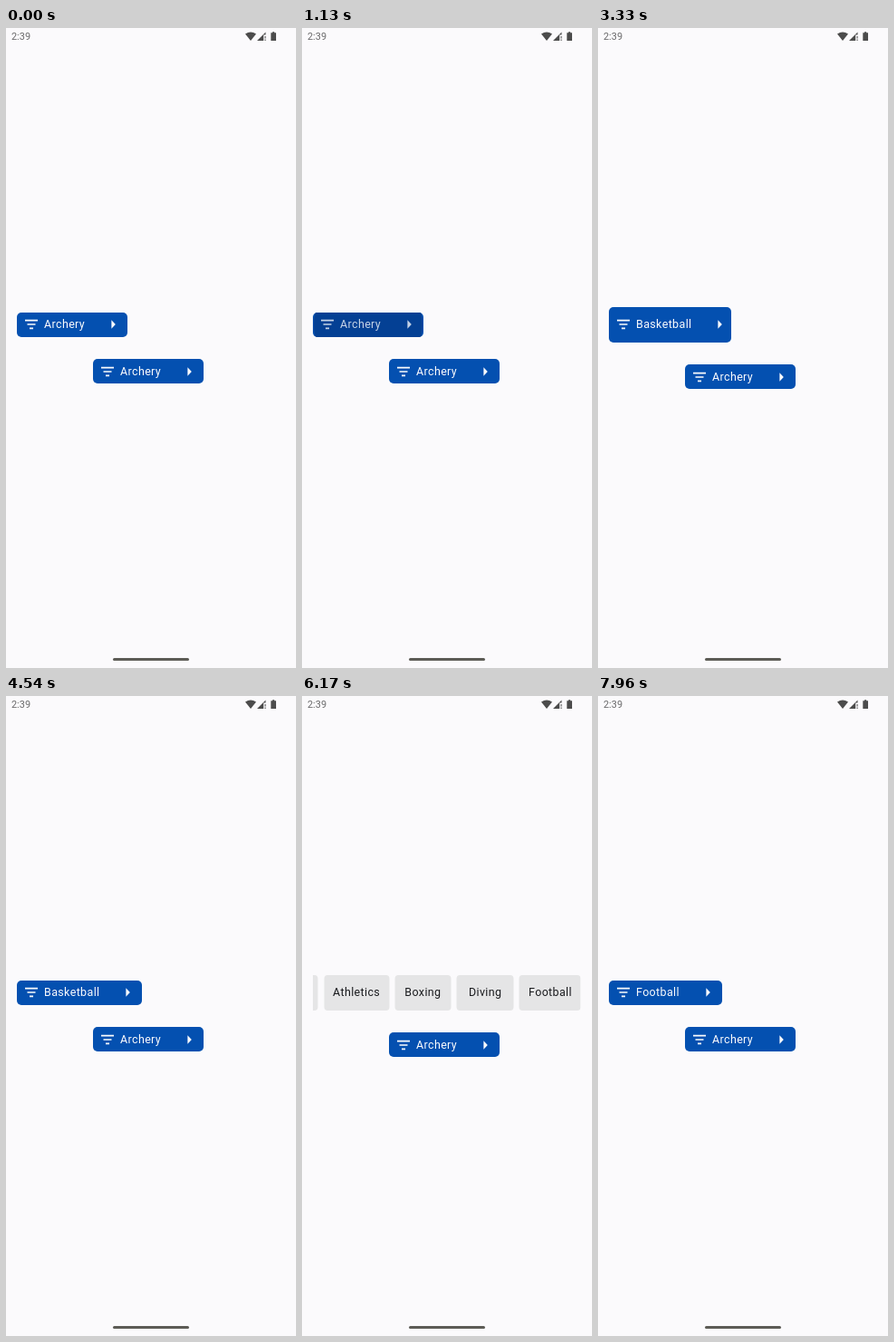
Write an HTML page that moves like this. It is 320x704 px and loops after 8 s.

```html
<!DOCTYPE html>
<html lang="en">
<head>
<meta charset="utf-8">
<title>Sport filter chips</title>
<style>
  html, body { margin: 0; width: 100%; height: 100%; overflow: hidden; background: #fbfafc; }
  body { position: relative; font: 400 12.44px/16px Roboto, "Noto Sans", sans-serif; letter-spacing: .39px; }
  div, svg, span { position: absolute; }
  .clock { left: 6px; top: 2px; font-size: 10.9px; letter-spacing: 0; color: #69696a; }
  .status { left: 262px; top: 2px; }
  .nav { left: 118px; top: 692.5px; width: 84px; height: 3.4px; border-radius: 2px; background: #5d5c56; }
  .view { left: 12px; top: 300px; width: 296px; height: 54px; overflow: hidden; }
  .row { left: 0; top: 0; height: 54px; }
  .list { top: 0; height: 54px; overflow: hidden; }
  .track { top: 0; height: 54px; }
  .chip { top: 6.7px; height: 39.3px; border-radius: 4px; background: #e5e5e6; color: #1a1b1e; overflow: hidden; }
  .chip span { left: 0; width: 100%; top: 11.7px; text-align: center; white-space: nowrap; }
  .head { border-radius: 5px; background: #0450b0; overflow: hidden; color: #fafbfd; }
  .head .label { left: 30px; top: 50%; margin-top: -8px; white-space: nowrap; }
  .head svg { left: 0; top: 50%; margin-top: -14px; }
  .ripple { border-radius: 50%; background: #044094; }
  .chip .ripple { background: rgba(30, 30, 40, .12); }
</style>
</head>
<body>
<div class="clock">2:39</div>
<svg class="status" width="40" height="16" fill="#4c4c4c">
  <path d="M2 4.6Q8 .6 14 4.6L8 12Z"/>
  <path d="M15 12L24.5 2.5V5.4H22.2V12Z"/>
  <path d="M23.4 7h1.4v2.5h-1.4zM23.4 10.6h1.4V12h-1.4z" fill="#7c7c7c"/>
  <path d="M30.3 3.3H32V2.2H34.2V3.3H36V12H30.3Z"/>
</svg>
<div class="view"><div class="row"></div></div>
<div class="nav"></div>
<script>
const LOOP = 8000, VIEW = 296, GAP = 6.3, ARROW = 24;
const WIDTHS = { Archery: 65, Athletics: 72, Basketball: 81, Boxing: 62, Diving: 63, Football: 68 };
const NAMES = Object.keys(WIDTHS);

// Each selection: when it takes effect, when its list opens and closes.
const PHASES = [
  { name: "Archery", from: 0, open: 1150, press: 1000 },
  { name: "Basketball", from: 2880, arrow: 3160, snap: 3420, open: 4895, press: 4720 },
  { name: "Football", from: 6800, arrow: 7060, snap: 7360, open: Infinity, press: Infinity }
];
const TAPS = [["Basketball", 2660, 2880], ["Football", 6590, 6800]];

const row = document.querySelector(".row");
const clamp = (v, a = 0, b = 1) => Math.min(b, Math.max(a, v));
const ease = x => { x = clamp(x); return x * x * (3 - 2 * x); };

// Critically damped spring from 0 to 1
const spring = ms => {
  const x = Math.max(0, ms) / 50;
  return 1 - (1 + x) * Math.exp(-x);
};

function add(parent, cls, tag = "div") {
  const el = document.createElement(tag);
  el.className = cls;
  parent.append(el);
  return el;
}

function place(el, x, w) {
  el.style.left = x + "px";
  el.style.width = w + "px";
}

function makeHead(parent) {
  const el = add(parent, "head");
  const ripple = add(el, "ripple");
  el.insertAdjacentHTML("beforeend",
    `<svg width="160" height="28"><path d="M9 9.6H23M11.5 14H20.5M14 18.4H18" stroke="#fafbfd" stroke-width="1.7"/>
     <path class="arrow" d="M0 9.3L4.4 14L0 18.7Z" fill="#fafbfd"/></svg>`);
  const label = add(el, "label", "span");
  return { el, ripple, label, icon: el.querySelector("svg"), arrow: el.querySelector(".arrow") };
}

function setHead(h, name, extra) {
  const full = WIDTHS[name] + 33;
  h.label.textContent = name;
  h.el.style.width = full + extra + "px";
  h.arrow.setAttribute("transform", `translate(${full + ARROW - 17.6} 0)`);
}

function setRipple(el, x, y, r, alpha) {
  Object.assign(el.style, {
    left: x - r + "px", top: y - r + "px",
    width: 2 * r + "px", height: 2 * r + "px", opacity: alpha
  });
}

const head = makeHead(row);
const list = add(row, "list");
const track = add(list, "track");
const chips = NAMES.map(name => {
  const el = add(track, "chip");
  const ripple = add(el, "ripple");
  add(el, "", "span").textContent = name;
  el.style.width = WIDTHS[name] + "px";
  return { name, el, ripple };
});

const second = makeHead(document.body);
second.el.style.left = "96px";
second.el.style.height = "27.4px";
second.ripple.style.display = "none";
setHead(second, "Archery", ARROW);

function draw(t) {
  const ph = PHASES.filter(p => t >= p.from).pop();
  const opening = t >= ph.open;
  const initial = ph.from === 0;
  let p = opening ? spring(t - ph.open) : initial ? 0 : 1 - spring(t - ph.from);
  if (p < .004) p = 0;
  const tall = opening || (!initial && t < ph.snap);
  const extra = ARROW * (opening ? 1 - p : initial ? 1 : spring(t - ph.arrow));

  // Header
  setHead(head, ph.name, extra);
  const headW = WIDTHS[ph.name] + 33 + extra;
  const h = tall ? 39.3 : 27.4;
  head.el.style.top = (tall ? 6.7 : 12.7) + "px";
  head.el.style.height = h + "px";
  second.el.style.top = (tall ? 370 : 364) + "px";

  const age = t - ph.press;
  const shade = age < 0 ? 0 : clamp(age / 75) * (1 - clamp((age - 430) / 150));
  setRipple(head.ripple, headW / 2, h / 2, 10 + 80 * ease(age / 225), shade);
  head.label.style.opacity = head.icon.style.opacity = 1 - .22 * shade;

  // List reveals itself from its far end
  let total = 0;
  for (const c of chips) {
    const shown = c.name !== ph.name;
    c.el.style.display = shown ? "" : "none";
    if (shown) {
      c.el.style.left = total + "px";
      total += WIDTHS[c.name] + GAP;
    }
    const tap = TAPS.find(a => a[0] === c.name);
    const on = tap && t >= tap[1] && t < tap[2] ? 1 : 0;
    setRipple(c.ripple, WIDTHS[c.name] / 2, 19.6, on ? 6 + 45 * ease((t - tap[1]) / 200) : 0, on);
  }
  total -= GAP;
  place(list, headW + GAP, total * p);
  place(track, -total * (1 - p), total);

  const swipe = t > 5450 ? 1 - Math.pow(1 - clamp((t - 5450) / 650), 3) : 0;
  const limit = Math.max(0, headW + GAP + total * p - VIEW);
  row.style.transform = `translateX(${-Math.min(182 * swipe, limit)}px)`;
  row.style.width = headW + GAP + total + "px";
}

const start = performance.now();
function tick() {
  draw((performance.now() - start) % LOOP);
  requestAnimationFrame(tick);
}
tick();
</script>
</body>
</html>
```
